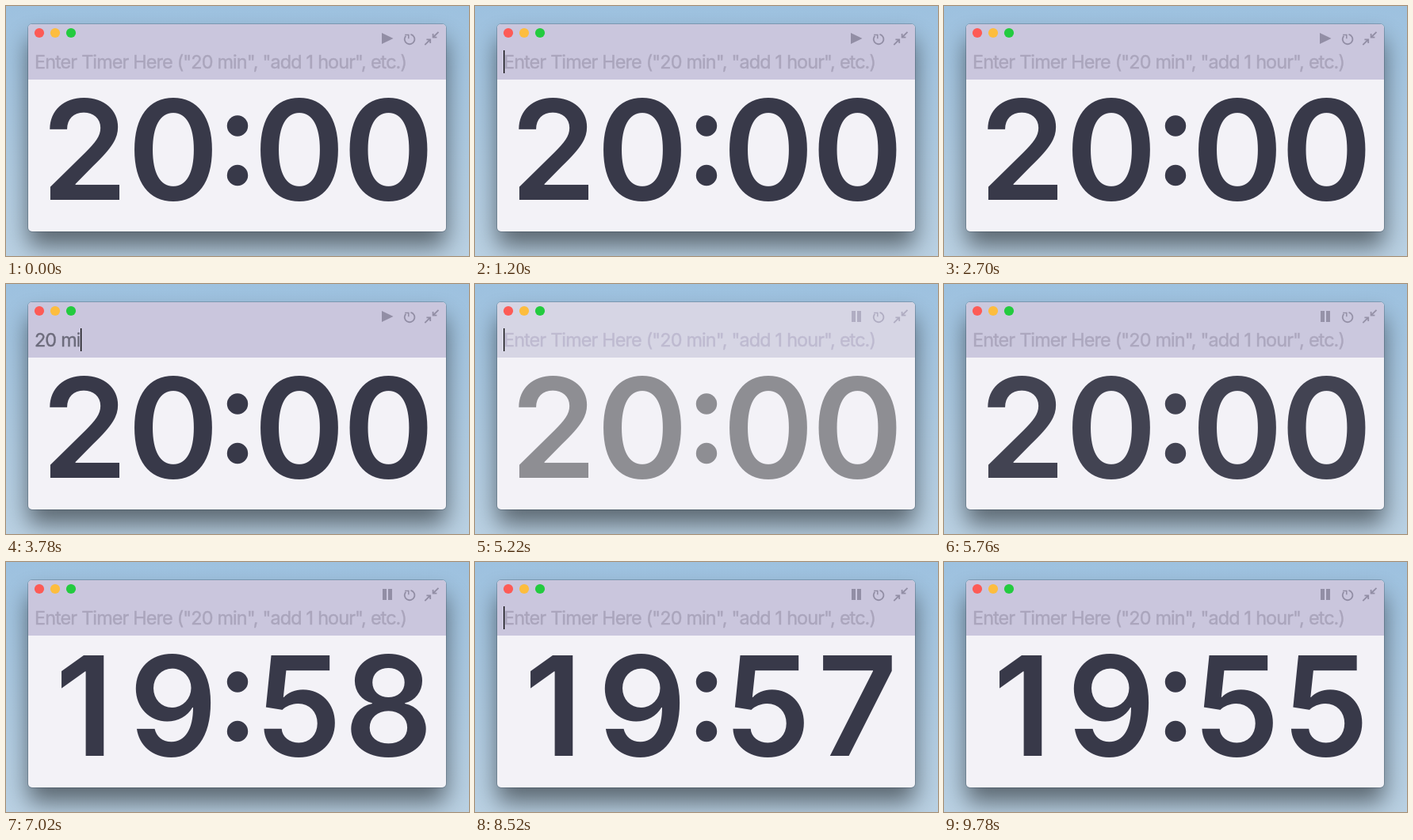
An HTML page that plays this animation: 584 px wide and 316 px high, repeating every 9840 ms.

```html
<!DOCTYPE html>
<html lang="en">
<head>
<meta charset="utf-8">
<title>Timer</title>
<style>
  html, body { margin: 0; width: 100%; height: 100%; overflow: hidden; }
  svg { display: block; width: 584px; height: 316px; }
  text { font-family: Inter, Roboto, sans-serif; }
  #field { font-size: 23.4px; letter-spacing: -0.9px; word-spacing: 0.25px; stroke-width: 0.4px; }
  #digits { font-size: 175px; font-weight: 600; text-anchor: middle; }
</style>
</head>
<body>
<svg viewBox="0 0 584 316">
  <defs>
    <linearGradient id="sky" x1="0" y1="0" x2="0" y2="1">
      <stop offset="0" stop-color="#9dc1df"/>
      <stop offset="1" stop-color="#bad1e3"/>
    </linearGradient>
    <filter id="blur" x="-20%" y="-30%" width="140%" height="170%">
      <feGaussianBlur stdDeviation="15"/>
    </filter>
    <clipPath id="frame"><rect x="28" y="23" width="527" height="262" rx="5"/></clipPath>
  </defs>
  <rect width="584" height="316" fill="url(#sky)"/>
  <rect x="28" y="42" width="527" height="262" rx="6" opacity=".5" filter="url(#blur)"/>
  <rect x="27.5" y="22.5" width="528" height="263" rx="5.5" fill="none" stroke="#203040" stroke-opacity=".25"/>
  <g clip-path="url(#frame)">
    <rect x="28" y="23" width="527" height="262" fill="#f3f2f7"/>
    <rect id="header" x="28" y="23" width="527" height="70"/>
  </g>
  <circle cx="42" cy="34" r="6.1" fill="#fd5b56"/>
  <circle cx="62" cy="34" r="6.1" fill="#fdbd3e"/>
  <circle cx="82" cy="34" r="6.1" fill="#23cb3f"/>
  <g id="icons">
    <path id="play" d="M474 34L488.5 41L474 48Z" fill="currentColor"/>
    <path id="pause" d="M475 34h5v14h-5zM482 34h5v14h-5z" fill="currentColor"/>
    <g fill="none" stroke="currentColor" stroke-width="1.8">
      <path d="M510.5 35.8A6.3 6.3 0 1 1 504.3 37.8"/>
      <path d="M503.2 36.6h4.6v4.6" stroke-width="1.5"/>
      <path d="M545.5 32.8L538.8 39.5M538.6 35v4.7h4.8M528.3 49.2L535 42.5M530.4 42.3h4.8v4.8"/>
    </g>
  </g>
  <text id="field" x="36" y="79" xml:space="preserve"></text>
  <rect id="caret" y="56" width="1.3" height="29" fill="#000"/>
  <g id="digits">
    <text x="99" y="245"></text>
    <text x="211" y="245"></text>
    <text x="370" y="245"></text>
    <text x="482.5" y="245"></text>
    <circle cx="292" cy="151.5" r="13.2"/>
    <circle cx="292" cy="214" r="13.2"/>
  </g>
</svg>
<script>
const LOOP = 9840, STEP = 60, ENTER = 4800;
const HINT = 'Enter Timer Here ("20 min", "add 1 hour", etc.)';
const TYPED = '20 minutes';
const keyTimes = [3360, 3480, 3600, 3660, 3780, 3840, 3960, 4200, 4260, 4320];
// The caret flips at each of these times, starting hidden.
const blinks = [180, 660, 1140, 1680, 2220, 2700, 3180, 5280, 6240, 6720,
  7260, 7740, 8220, 8760, 9240, 9780];
const colors = {
  header: [[202, 198, 221], [214, 213, 228]],
  icons: [[146, 142, 165], [176, 173, 194]],
  hint: [[170, 165, 188], [190, 186, 208]],
  digits: [[56, 57, 73], [142, 142, 147]]
};

const $ = id => document.getElementById(id);
const field = $('field'), caret = $('caret');
const cells = [...$('digits').querySelectorAll('text')];
const ease = u => (1 - Math.cos(Math.PI * Math.min(1, Math.max(0, u)))) / 2;
const countPast = (times, t) => times.filter(x => x <= t).length;
const show = (el, on) => el.setAttribute('visibility', on ? 'visible' : 'hidden');
const two = n => String(n).padStart(2, '0');

function mix(name, k) {
  const [a, b] = colors[name];
  return `rgb(${a.map((v, i) => Math.round(v + (b[i] - v) * k))})`;
}

function render(time) {
  const t = Math.floor((time % LOOP) / STEP) * STEP;
  const running = t >= ENTER;
  const dim = ease((t - 4800) / 420) - ease((t - 5340) / 540);

  $('header').setAttribute('fill', mix('header', dim));
  $('icons').style.color = mix('icons', dim);
  $('digits').setAttribute('fill', mix('digits', dim));
  show($('play'), !running);
  show($('pause'), running);

  const typed = running ? '' : TYPED.slice(0, countPast(keyTimes, t));
  const ink = typed ? '#6c6b7b' : mix('hint', dim);
  field.textContent = typed || HINT;
  field.setAttribute('fill', ink);
  field.setAttribute('stroke', ink);
  caret.setAttribute('x', typed ? 36.5 + field.getComputedTextLength() : 36);
  show(caret, countPast(blinks, t) % 2);

  const elapsed = t < 6120 ? 0 : Math.floor((t - 6120) / 900) + 1;
  const left = 1200 - elapsed;
  const clock = two(Math.floor(left / 60)) + two(left % 60);
  cells.forEach((cell, i) => { cell.textContent = clock[i]; });
}

const start = performance.now();
function tick() {
  render(performance.now() - start);
  requestAnimationFrame(tick);
}
render(0);
tick();
</script>
</body>
</html>
```
